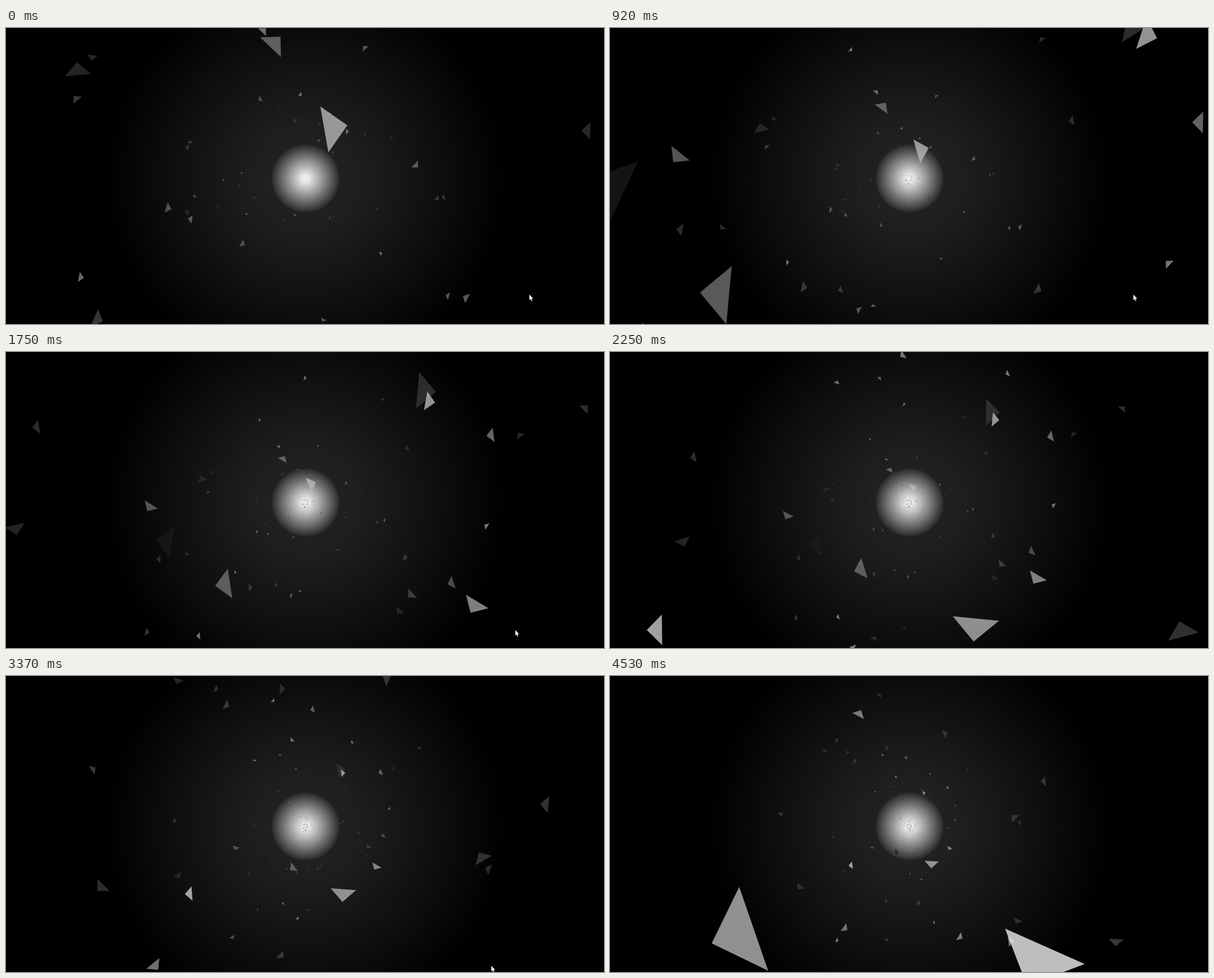
Write an HTML page with a canvas that moves like this. It is 1062 px wide and 527 px high and loops after 4.58 s.

```html
<!DOCTYPE html>
<html lang="en">
<head>
<meta charset="utf-8">
<title>Shard tunnel</title>
<style>
  html, body { margin: 0; width: 100%; height: 100%; overflow: hidden; background: #000; }
  canvas { display: block; }
</style>
</head>
<body>
<canvas id="stage" width="1062" height="527"></canvas>
<script>
const W = 1062, H = 527, CX = 532, CY = 268, LOOP = 4.58;
const RAD = Math.PI / 180, TAU = Math.PI * 2;
const ctx = document.getElementById('stage').getContext('2d');

function random(seed) {
  return () => {
    seed = (seed * 1664525 + 1013904223) >>> 0;
    return seed / 4294967296;
  };
}
const rnd = random(7);
const range = (lo, hi) => lo + (hi - lo) * rnd();
const grey = (v, a = 1) => `rgba(${v | 0},${v | 0},${v | 0},${a})`;

// Distance travelled down the tunnel; sizes shrink with its exponential.
const depth = t => .45 * t + .05 * (1 - Math.exp(-t / .4));

// Pose at time t0. near: how close to the viewer it starts; spin: degrees per second.
function hero(t0, x, y, size, heading, tone, near, spin) {
  return {
    t0, size, tone, near, heading: heading * RAD,
    r: Math.hypot(x - CX, y - CY), angle: Math.atan2(y - CY, x - CX),
    turn: dt => -spin * dt * RAD
  };
}
const heroes = [
  hero(0, 579, 178, 83, -10, 150, .5, 6.5),
  hero(0, 127, 76, 46, -95, 38, .05, 7.3),
  hero(.56, 481, 108, 35, -51, 95, .27, 8),
  hero(1.23, 146, 313, 85, 200, 22, .95, 17),
  hero(1.23, 290, 448, 79, 180, 92, .8, 17),
  hero(1.75, 742, 69, 65, 5, 45, .35, 9.3),
  hero(1.75, 751, 88, 34, 10, 150, .35, 9.8),
  hero(2.71, 624, 438, 64, 95, 145, .2, 1.2),
  hero(2.71, 213, 439, 39, 178, 165, .5, 3),
  hero(2.71, 708, 371, 27, 120, 130, .2, 1),
  hero(4.53, 762, 505, 155, 114, 195, 1.5, 2),
  hero(4.53, 230, 459, 158, 161, 148, 1.5, 2)
];

// Small shards fill the tunnel evenly in depth; those below swirl faster than those above.
const shards = Array.from({ length: 115 }, () => {
  const r = 20 * Math.exp(range(0, 4.7)), angle = range(0, TAU);
  return {
    t0: 2.3, r, angle, near: .04,
    size: r * (.04 + .08 * rnd() * rnd()),
    heading: range(0, TAU),
    tone: rnd() < .6 ? range(36, 60) : range(75, 125),
    turn: dt => -dt * RAD * (10.5 + 5 * Math.cos(angle - (70 + 5 * dt) * RAD))
  };
});

// Specks gathering on the core.
const dust = Array.from({ length: 40 }, () => ({
  angle: range(0, TAU), r: range(3, 17), size: range(1.5, 4), from: range(-.3, 1.1)
}));

function radial(r, ...stops) {
  const g = ctx.createRadialGradient(CX, CY, 0, CX, CY, r);
  stops.forEach(([at, v]) => g.addColorStop(at, grey(v)));
  return g;
}
const backdrop = radial(356, [0, 37], [.3, 29], [.65, 15], [1, 0]);
const glow = radial(60, [0, 240], [.1, 234], [1, 42]);

// Right isosceles triangle around its centroid.
function triangle(x, y, size, heading, fill) {
  const c = Math.cos(heading) * size, s = Math.sin(heading) * size;
  ctx.fillStyle = fill;
  ctx.beginPath();
  ctx.moveTo(x + c / 3, y + s / 3);
  ctx.lineTo(x - c / 6 - s / 2, y - s / 6 + c / 2);
  ctx.lineTo(x - c / 6 + s / 2, y - s / 6 - c / 2);
  ctx.fill();
}

function polar(r, angle, size, heading, fill) {
  triangle(CX + r * Math.cos(angle), CY + r * Math.sin(angle), size, heading, fill);
}

function drawShard(p, t) {
  const d = (1 + p.near) * Math.exp(depth(t) - depth(p.t0)) - p.near;
  if (d < .05) return;
  const turn = p.turn(t - p.t0);
  polar(p.r / d, p.angle + turn, p.size / d, p.heading + turn,
    grey(Math.min(255, p.tone * 1.22), .8));
}

function drawDust(p, t) {
  const age = t - p.from;
  if (age < 0) return;
  const r = p.r * (.65 + .6 * Math.exp(-age * .6));
  polar(r, p.angle - t * .1, p.size, p.angle * 2, grey(125, Math.min(.5, age)));
}

// Pointer slides off the lower edge, then peeks in again.
const ease = (t, from, to) => Math.max(0, Math.min(1, (t - from) / (to - from)));
const arrow = new Path2D('M0 0V10L2.2 8L3.8 11.5L5.2 10.9L3.7 7.4L6.6 7.2Z');

function drawPointer(t) {
  const away = ease(t, 1.64, 1.94);
  const peek = ease(t, 3.2, 3.36) - ease(t, 3.42, 3.58);
  ctx.save();
  ctx.translate(929.5 - 67.5 * away, 474.5 + 55.5 * away - 14 * peek);
  ctx.strokeStyle = '#000';
  ctx.fillStyle = '#fff';
  ctx.stroke(arrow);
  ctx.fill(arrow);
  ctx.restore();
}

function draw(t) {
  ctx.fillStyle = backdrop;
  ctx.fillRect(0, 0, W, H);
  ctx.fillStyle = glow;
  ctx.beginPath();
  ctx.arc(CX, CY, 60, 0, TAU);
  ctx.fill();
  dust.forEach(p => drawDust(p, t));
  shards.forEach(p => drawShard(p, t));
  heroes.forEach(p => drawShard(p, t));
  drawPointer(t);
}

const start = performance.now();
function tick() {
  draw((performance.now() - start) / 1000 % LOOP);
  requestAnimationFrame(tick);
}
tick();
</script>
</body>
</html>
```
